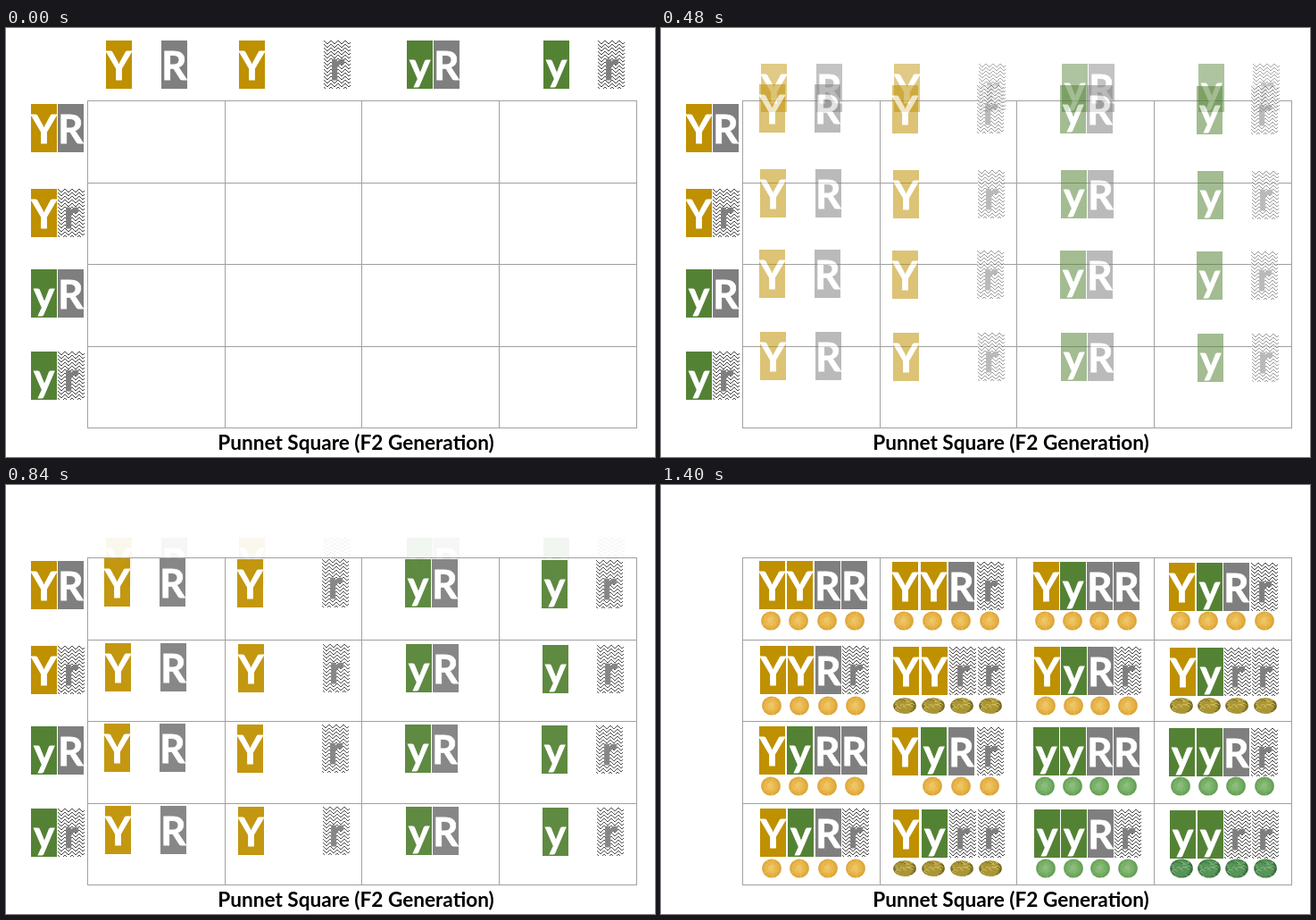
Animation, 727 px wide and 480 px high, one loop 1460 ms. Source, as an HTML page with a canvas:

```html
<!DOCTYPE html>
<html lang="en">
<head>
<meta charset="utf-8">
<title>Punnet square</title>
<style>
  html, body { margin: 0; width: 100%; height: 100%; overflow: hidden; background: #fff; }
  canvas { display: block; }
</style>
</head>
<body>
<canvas id="stage" width="727" height="480"></canvas>
<script>
const ctx = document.getElementById('stage').getContext('2d');

const LOOP = 1460, STEP = 60, WIPE_START = 1160, PEAS_START = 1400;
const FLOAT_STEPS = 15, WIPE_STEPS = 4, FLOAT_DISTANCE = 48, SOFT_EDGE = 0.5;
const TILE_W = 29, TILE_H = 54, LABEL_X = 28, HEADING_Y = 14;
const FILL = { Y: '#bf9000', y: '#548235', R: '#7f7f7f' };
const GAMETES = ['YR', 'Yr', 'yR', 'yr'];
const ROW_Y = [85, 180, 270, 362];
const COLUMNS = [
  { x: 110, pitch: 30.8 }, { x: 259, pitch: 31.5 },
  { x: 417, pitch: 30.1 }, { x: 569, pitch: 30.6 }
];
const INDEXES = [0, 1, 2, 3];

function seededRandom(seed) {
  return () => (seed = seed * 16807 % 2147483647) / 2147483647;
}

const tileWidth = letter => letter === 'r' ? TILE_W + 1 : TILE_W;

function makeSprite(width, height, paint) {
  const sprite = document.createElement('canvas');
  sprite.width = width;
  sprite.height = height;
  paint(sprite.getContext('2d'));
  return sprite;
}

function paintZigzag(g, width) {
  g.fillStyle = '#484848';
  for (let x = 0; x < width; x++) {
    const rise = Math.min(x % 8, 7 - x % 8);
    for (let y = rise; y < TILE_H; y += 4) g.fillRect(x, y, 1, 1);
  }
}

function makeTile(letter) {
  const width = tileWidth(letter);
  return makeSprite(width, TILE_H, g => {
    g.fillStyle = FILL[letter] || '#fff';
    g.fillRect(0, 0, width, TILE_H);
    if (letter === 'r') paintZigzag(g, width);
    g.font = 'bold 44px Lato, Carlito, sans-serif';
    g.textAlign = 'center';
    g.fillStyle = g.strokeStyle = letter === 'r' ? '#7f7f7f' : '#fff';
    g.lineWidth = 0.8;
    const baseline = letter === 'y' ? 45 : 43.5;
    g.fillText(letter, width / 2, baseline);
    g.strokeText(letter, width / 2, baseline);
  });
}

// Speckled when round, covered in short curved creases when wrinkled
function makePea(yellow, round) {
  const [light, mid, dark] = round
    ? (yellow ? ['#efc566', '#e3ae3f', '#d2962b'] : ['#8dbd7c', '#6ea95e', '#528d45'])
    : (yellow ? ['#d3c05c', '#aa9536', '#73641f'] : ['#86b985', '#579457', '#356b3b']);
  return makeSprite(28, 24, g => {
    const random = seededRandom(7);
    const shade = g.createRadialGradient(13, 11, 2, 14, 12, 12);
    shade.addColorStop(0, round ? light : mid);
    shade.addColorStop(0.65, mid);
    shade.addColorStop(1, dark);
    g.beginPath();
    g.ellipse(14, 12, round ? 10.8 : 12.8, round ? 10.5 : yellow ? 9 : 10.5, 0, 0, Math.PI * 2);
    g.fillStyle = shade;
    g.fill();
    g.clip();
    for (let i = 0; i < 36; i++) {
      const x = random() * 26, y = random() * 22, length = round ? 1 : 3 + random() * 4;
      g.strokeStyle = i % 2 ? light : round ? mid : dark;
      g.beginPath();
      g.moveTo(x, y);
      g.quadraticCurveTo(x + length / 2, y - length / 2, x + length, y + random() * 2);
      g.stroke();
    }
  });
}

const TILES = Object.fromEntries([...'YyRr'].map(letter => [letter, makeTile(letter)]));
const PEAS = Object.fromEntries([...'YyRr'].slice(0, 2).flatMap(color =>
  [...'Rr'].map(shape => [color + shape, makePea(color === 'Y', shape === 'R')])));

function drawTile(letter, x, y, alpha = 1) {
  ctx.globalAlpha = alpha;
  ctx.drawImage(TILES[letter], Math.round(x), Math.round(y));
  ctx.globalAlpha = 1;
}

// Soft-edged wipe from the left, done with a white cover
function wipeTile(letter, x, y, progress, entering) {
  drawTile(letter, x, y);
  const width = tileWidth(letter), edge = progress * (1 + SOFT_EDGE);
  const cover = ctx.createLinearGradient(x + (edge - SOFT_EDGE) * width, 0, x + edge * width, 0);
  cover.addColorStop(entering ? 0 : 1, 'rgba(255,255,255,0)');
  cover.addColorStop(entering ? 1 : 0, '#fff');
  ctx.fillStyle = cover;
  ctx.fillRect(Math.round(x), y, width, TILE_H);
}

function drawTable() {
  ctx.strokeStyle = '#a0a0a0';
  ctx.lineWidth = 1;
  ctx.beginPath();
  for (let i = 0; i <= 4; i++) {
    const x = Math.floor(91.5 + 153.7 * i) + 0.5, y = Math.floor(81.5 + 91.6 * i) + 0.5;
    ctx.moveTo(x, 81);
    ctx.lineTo(x, 448);
    ctx.moveTo(91, y);
    ctx.lineTo(707, y);
  }
  ctx.stroke();
  ctx.font = 'bold 22.6px Lato, Carlito, sans-serif';
  ctx.textAlign = 'center';
  ctx.fillStyle = '#000';
  ctx.fillText('Punnet Square (F2 Generation)', 392, 472);
}

// Slots in a cell: 0 and 1 hold the colour genes, 2 and 3 the shape genes
const ownSlots = col => [col < 2 ? 0 : 1, col % 2 ? 3 : 2];
const slotX = (col, slot) => Math.round(COLUMNS[col].x + COLUMNS[col].pitch * slot);

function drawPeas(row, col, x, y) {
  const genes = GAMETES[row] + GAMETES[col];
  const pea = PEAS[(genes.includes('Y') ? 'Y' : 'y') + (genes.includes('R') ? 'R' : 'r')];
  const first = row === 2 && col === 1 ? 1 : 0; // this cell holds only three peas
  for (const i of INDEXES.slice(first))
    ctx.drawImage(pea, Math.round(x - 1 + COLUMNS[col].pitch * 1.02 * i), y + 55);
}

function drawCell(row, col, float, wipe, showPeas) {
  const shift = row % 2, y = ROW_Y[row] + Math.round(col * 0.6);
  ownSlots(col).forEach((slot, i) => {
    drawTile(GAMETES[col][i], slotX(col, slot) + shift, y - FLOAT_DISTANCE * (1 - float), float);
    const freeSlot = i ? 5 - slot : 1 - slot;
    if (wipe > 0) wipeTile(GAMETES[row][i], slotX(col, freeSlot) + shift, y, wipe, true);
  });
  if (showPeas) drawPeas(row, col, COLUMNS[col].x + shift, ROW_Y[row]);
}

function draw(time) {
  const float = Math.min(1, Math.floor(time / STEP) / FLOAT_STEPS);
  const wipe = time < WIPE_START ? 0
    : Math.min(1, (Math.floor((time - WIPE_START) / STEP) + 1) / WIPE_STEPS);

  ctx.fillStyle = '#fff';
  ctx.fillRect(0, 0, 727, 480);
  drawTable();

  for (const col of INDEXES)
    ownSlots(col).forEach((slot, i) =>
      drawTile(GAMETES[col][i], slotX(col, slot) + 2, HEADING_Y + FLOAT_DISTANCE * float, 1 - float));

  for (const row of INDEXES) {
    [...GAMETES[row]].forEach((letter, i) =>
      wipeTile(letter, LABEL_X + 30 * i, ROW_Y[row], wipe, false));
    for (const col of INDEXES) drawCell(row, col, float, wipe, time >= PEAS_START);
  }
}

const start = performance.now();
function tick() {
  draw((performance.now() - start) % LOOP);
  requestAnimationFrame(tick);
}
tick();
</script>
</body>
</html>
```
